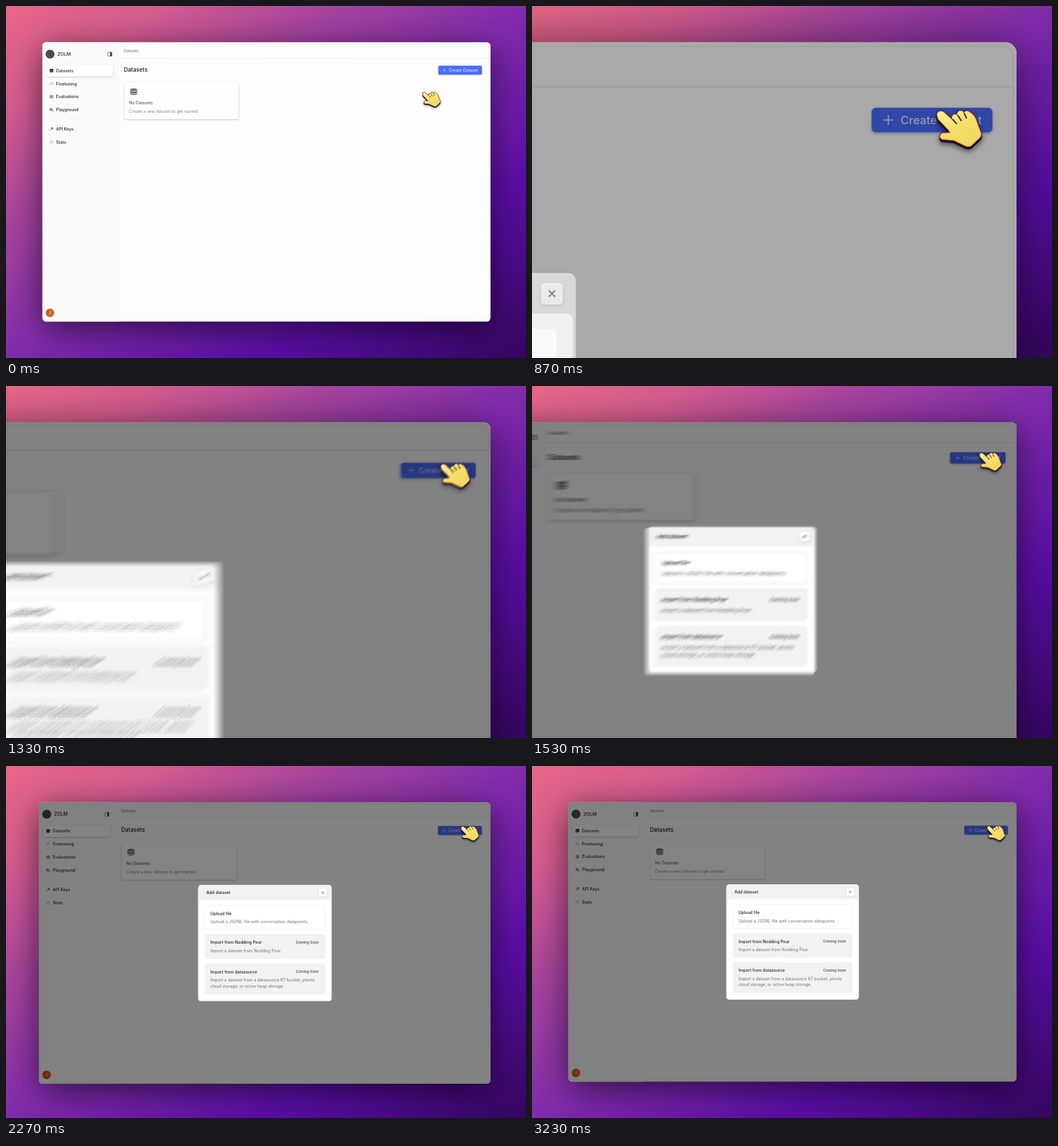
An HTML page with a canvas that plays this animation: 909 px wide and 616 px high, repeating every 3260 ms.

```html
<!DOCTYPE html>
<html lang="en">
<head>
<meta charset="utf-8">
<title>Create dataset</title>
<style>
  html, body { margin: 0; width: 100%; height: 100%; overflow: hidden; }
  canvas { display: block; }
</style>
</head>
<body>
<canvas id="stage" width="909" height="616"></canvas>
<script>
const W = 909, H = 616, LOOP = 3260;
const WIN = { x: 63.5, y: 63.2, w: 783.5, h: 489.3, r: 7 };
const RIGHT = WIN.x + WIN.w;
const ZOOM = 1.87, SHUTTER = 0.02;

const stage = document.getElementById('stage').getContext('2d');
const layer = document.createElement('canvas');
layer.width = W;
layer.height = H;
const c = layer.getContext('2d');

const clamp = v => Math.max(0, Math.min(1, v));
const mix = (a, b, p) => a + (b - a) * p;

// Overdamped spring from 0 to 1 with a slow and a fast rate.
function spring(t, slow, fast = 20) {
  if (t <= 0) return 0;
  return 1 - (fast * Math.exp(-slow * t) - slow * Math.exp(-fast * t)) / (fast - slow);
}

const zoomAt = t => 1 + ZOOM * (spring(t - 0.195, 4.85) - spring(t - 1.081, 4.85));
const openAt = t => clamp((t - 0.75) / 0.18);

function pointerAt(t) {
  const p = spring(t - 0.01, 7);
  const press = t < 0.57 ? clamp((t - 0.45) / 0.12) : Math.exp((0.57 - t) / 0.7);
  return { x: mix(729.2, 796.6, p), y: mix(152.6, 106.8, p), press: 1 - 0.14 * press };
}

function box(x, y, w, h, r, fill, stroke, line = 0.6) {
  c.beginPath();
  c.roundRect(x, y, w, h, r);
  if (fill) { c.fillStyle = fill; c.fill(); }
  if (stroke) { c.strokeStyle = stroke; c.lineWidth = line; c.stroke(); }
}

function shadowBox(zoom, blur, dy, color, ...args) {
  c.save();
  c.shadowColor = color;
  c.shadowBlur = blur * zoom;
  c.shadowOffsetY = dy * zoom;
  box(...args);
  c.restore();
}

function text(str, x, cy, size, color, weight = 400) {
  c.font = `${weight} ${size}px Inter, "Liberation Sans", sans-serif`;
  c.fillStyle = color;
  c.fillText(str, x, cy + size * 0.36);
}

function lines(color, width, ...segs) {
  c.strokeStyle = color;
  c.lineWidth = width;
  c.beginPath();
  for (const [x1, y1, x2, y2] of segs) {
    c.moveTo(x1, y1);
    c.lineTo(x2, y2);
  }
  c.stroke();
}

function disc(x, y, r, color) {
  c.fillStyle = color;
  c.beginPath();
  c.arc(x, y, r, 0, 7);
  c.fill();
}

function database(x, y, w, color, gap) {
  const rx = w / 2, ry = w / 5, h = w * 0.55;
  c.fillStyle = color;
  c.beginPath();
  c.ellipse(x, y - h / 2, rx, ry, 0, Math.PI, 0);
  c.lineTo(x + rx, y + h / 2);
  c.ellipse(x, y + h / 2, rx, ry, 0, 0, Math.PI);
  c.closePath();
  c.fill();
  c.strokeStyle = gap;
  c.lineWidth = w * 0.07;
  for (const k of [-0.42, 0.2]) {
    c.beginPath();
    c.ellipse(x, y + h * k, rx, ry, 0, 0, Math.PI);
    c.stroke();
  }
}

const icons = {
  data: y => database(79.5, y, 6.6, '#222', '#eee'),
  tools: y => lines('#888', 0.8, [76.5, y + 2.5, 81, y - 2], [77, y - 2, 78.5, y - 0.5],
    [80.5, y + 0.5, 82.5, y + 2.5], [80, y - 2.5, 82, y - 1]),
  table: y => {
    box(76.8, y - 2.5, 5.6, 5, 0.7, '#bbb', '#777');
    lines('#777', 0.6, [76.8, y, 82.4, y], [79.6, y - 2.5, 79.6, y + 2.5]);
  },
  chat: y => {
    box(76.3, y - 2.8, 4.4, 4.4, 1, '#888');
    box(79.3, y - 0.6, 3.6, 3.4, 1, '#bbb', '#999', 0.5);
  },
  key: y => {
    lines('#777', 1, [76.8, y + 2.6, 79.8, y - 0.4]);
    disc(80.8, y - 1.2, 2, '#888');
  }
};

const menu = [
  ['Datasets', 113.2, 'data'], ['Finetuning', 136, 'tools'], ['Evaluations', 158.8, 'table'],
  ['Playground', 181.6, 'chat'], ['API Keys', 215.2, 'key'], ['Stats', 238, 'tools']
];

function sidebar(zoom) {
  c.fillStyle = '#fafafa';
  c.fillRect(WIN.x, WIN.y, 133, WIN.h);
  disc(77, 84.3, 7.8, '#4a4a4a');
  text('ZOLM', 90, 84.3, 8.2, '#222', 500);
  box(178.2, 80.8, 7, 7, 1, '#fff', '#555', 0.8);
  c.fillStyle = '#444';
  c.fillRect(181.8, 81, 3.2, 6.6);
  shadowBox(zoom, 3, 1, 'rgba(0,0,0,.22)', 71, 104, 116, 19.5, 2, '#fff');
  for (const [label, y, icon] of menu) {
    icons[icon](y);
    text(label, 87.6, y, 7.2, '#222', 500);
  }
  disc(76.8, 537, 7.5, '#d4611e');
  text('J', 75.2, 537, 6.4, '#f6d9c4', 500);
}

function page(zoom) {
  c.fillStyle = '#fdfdfd';
  c.fillRect(WIN.x, WIN.y, WIN.w, WIN.h);
  sidebar(zoom);
  lines('#ececec', 0.8, [196.5, 91.4, 845, 91.4]);
  box(WIN.x + 2, WIN.y + 2.6, WIN.w - 4.2, WIN.h - 5, 6, null, '#e9e9e9', 0.5);
  text('Datasets', 206, 78.4, 6.1, '#666');
  text('Datasets', 206, 111.4, 9.9, '#1c1c1c', 500);

  shadowBox(zoom, 3, 1, 'rgba(0,0,0,.25)', 207, 134, 199.5, 64, 2.5, '#fefefe');
  database(223.2, 150, 12.5, '#777', '#e4e4e4');
  text('No Datasets', 215, 169.8, 7.2, '#444', 400);
  text('Create a new dataset to get started', 215, 184.3, 7.25, '#858585');

  shadowBox(zoom, 2, 0.7, 'rgba(50,70,160,.5)', 755.8, 104.6, 76, 15.4, 2.6, '#4a6cfb');
  lines('#cdd6ff', 0.8, [763.2, 112.3, 769.4, 112.3], [766.3, 109.2, 766.3, 115.4]);
  text('Create Dataset', 774, 112.3, 7.2, '#e3e8ff', 500);
}

function option(y, h, title, body, soon) {
  box(352, y, 207.5, h, 3, soon ? '#f2f2f2' : '#fff', soon ? '#efefef' : '#ececec');
  text(title, 361, y + 14, 7.2, '#222', 500);
  body.forEach((row, i) => text(row, 361, y + 28.6 + i * 10.4, 7.2, '#707070'));
  if (soon) text('Coming Soon', 509, y + 14, 6.2, '#555', 600);
}

function dialog(zoom, open) {
  if (!open) return;
  c.save();
  c.globalAlpha = open;
  c.fillStyle = 'rgba(0,0,0,.485)';
  c.fillRect(WIN.x - 1, WIN.y - 1, WIN.w + 2, WIN.h + 2);

  const grow = mix(0.95, 1, open);
  c.translate(455.5, 308);
  c.scale(grow, grow);
  c.translate(-455.5, -308);
  box(339.5, 207, 232, 202, 5, '#f2f2f2');
  box(341.5, 233, 228, 174, 4, '#fefefe');
  text('Add dataset', 354, 220.2, 7.2, '#222', 500);
  shadowBox(zoom, 2.5, 0.6, 'rgba(0,0,0,.18)', 549.3, 213.4, 13.8, 13.8, 2.5, '#fff');
  lines('#555', 0.9, [554.2, 218.3, 558.2, 222.3], [558.2, 218.3, 554.2, 222.3]);

  option(242.5, 42, 'Upload file', ['Upload a JSONL file with conversation datapoints.']);
  option(293, 42, 'Import from Nodding Pear', ['Import a dataset from Nodding Pear.'], true);
  option(343.8, 53, 'Import from datasource',
    ['Import a dataset from a datasource K7 bucket, plonto',
     'cloud storage, or ochre heap storage.'], true);
  c.restore();
}

const hand = new Path2D('M-1 4Q-2-3 6-3Q9-3 12 0L29 16L27 8Q29 1 35 4L38 6L37 1' +
  'Q40-6 46-3L50 1Q52-5 57-3Q67 2 71 11L80 36Q83 42 79 46L63 61Q57 65 49 60' +
  'L30 51L8 49Q1 45 8 39L25 38L20 31L1 11Z');

function pointer({ x, y, press }, zoom) {
  c.save();
  c.translate(x, y);
  c.scale(1 / 2.75, 1 / 2.75);
  // The press shrinks the hand about its middle.
  c.translate(38, 30);
  c.scale(press, press);
  c.translate(-38, -30);
  c.lineJoin = c.lineCap = 'round';
  c.save();
  c.translate(0, 4);
  c.shadowColor = 'rgba(0,0,0,.5)';
  c.shadowBlur = 3.5 * zoom;
  c.shadowOffsetY = zoom;
  c.strokeStyle = c.fillStyle = '#24143c';
  c.lineWidth = 5;
  c.stroke(hand);
  c.fill(hand);
  c.restore();
  c.strokeStyle = '#3a1c38';
  c.lineWidth = 5;
  c.stroke(hand);
  c.strokeStyle = '#f19a45';
  c.lineWidth = 2.6;
  c.stroke(hand);
  const skin = c.createLinearGradient(20, 0, 50, 62);
  skin.addColorStop(0, '#f9ec93');
  skin.addColorStop(0.4, '#f3e06a');
  skin.addColorStop(1, '#f3d861');
  c.fillStyle = skin;
  c.fill(hand);
  lines('#4a2330', 2.6, [28, 12, 35, 20], [38, 5, 44, 14], [50, 1, 54, 9]);
  c.restore();
}

function drawWindow(t) {
  const zoom = zoomAt(t);
  c.setTransform(1, 0, 0, 1, 0, 0);
  c.clearRect(0, 0, W, H);
  c.setTransform(zoom, 0, 0, zoom, RIGHT * (1 - zoom), WIN.y * (1 - zoom));
  c.save();
  c.beginPath();
  c.roundRect(WIN.x, WIN.y, WIN.w, WIN.h, WIN.r);
  c.clip();
  page(zoom);
  dialog(zoom, openAt(t));
  c.restore();
  pointer(pointerAt(t), zoom);
}

const sky = stage.createLinearGradient(168, -114, 741, 730);
[[0, '#e96787'], [0.16, '#d25b90'], [0.31, '#a8449d'], [0.5, '#812cab'],
 [0.75, '#5a0da6'], [1, '#350660']].forEach(([p, color]) => sky.addColorStop(p, color));

function backdrop(zoom) {
  stage.fillStyle = sky;
  stage.fillRect(0, 0, W, H);
  stage.save();
  stage.shadowColor = 'rgba(0,0,0,.62)';
  stage.shadowBlur = 58 * mix(1, zoom, 0.4);
  stage.shadowOffsetY = 12;
  stage.fillStyle = '#777';
  stage.beginPath();
  const w = WIN.w * zoom, h = WIN.h * zoom;
  stage.roundRect(RIGHT - w + 1, WIN.y + 1, w - 2, h - 2, WIN.r * zoom);
  stage.fill();
  stage.restore();
}

function render(t) {
  backdrop(zoomAt(t));
  // Average several poses across the shutter time for motion blur.
  const travel = Math.abs(zoomAt(t + SHUTTER / 2) - zoomAt(t - SHUTTER / 2)) * 600;
  const n = Math.max(1, Math.min(12, Math.ceil(travel / 1.5)));
  for (let i = 0; i < n; i++) {
    drawWindow(t + ((i + 0.5) / n - 0.5) * SHUTTER);
    stage.globalAlpha = 1 / (i + 1);
    stage.drawImage(layer, 0, 0);
  }
  stage.globalAlpha = 1;
}

const start = performance.now();
function tick() {
  render(((performance.now() - start) % LOOP) / 1000);
  requestAnimationFrame(tick);
}
tick();
</script>
</body>
</html>
```
